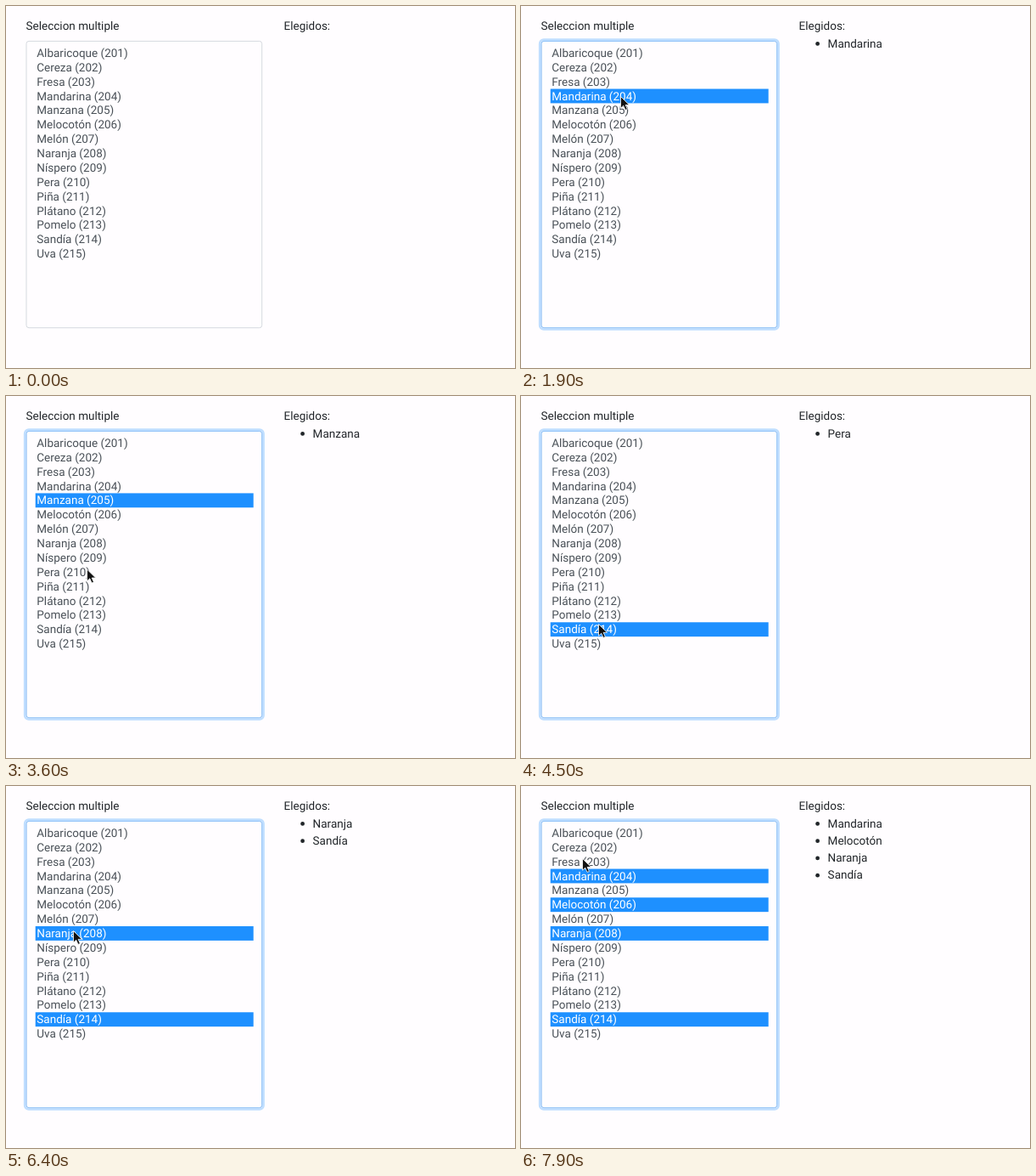
These frames come from a looping animation (600 by 426 pixels, 8000 ms). An HTML page:

```html
<!DOCTYPE html>
<html lang="es">
<head>
<meta charset="utf-8">
<title>Seleccion multiple</title>
<style>
  html, body { margin: 0; width: 100%; height: 100%; overflow: hidden; background: #fffdff; }
  svg { display: block; }
  /* The imperceptible skew keeps baselines at fractional heights. */
  text {
    font: 13.5px Roboto, Arial, sans-serif; fill: #212529;
    text-rendering: geometricPrecision; transform: skewX(.01deg);
  }
  .frame { fill: none; stroke: #ced4da; stroke-width: .85; }
  #focus .frame { stroke: #80bdff; }
  .option text { fill: #495057; }
  .option rect { fill: #1e90ff; visibility: hidden; }
  .option.on rect { visibility: visible; }
  .option.on text { fill: #fff; }
</style>
</head>
<body>
<svg width="600" height="426" viewBox="0 0 600 426">
  <text x="23.6" y="28.3">Seleccion multiple</text>
  <text x="327.6" y="28.3">Elegidos:</text>
  <rect class="frame" x="24" y="41.4" width="277.7" height="337.3" rx="3"/>
  <g id="focus">
    <rect x="22.2" y="39.6" width="281.3" height="340.9" rx="4.6" fill="none" stroke="#bfdeff" stroke-width="2.7"/>
    <rect class="frame" x="24" y="41.4" width="277.7" height="337.3" rx="3"/>
  </g>
  <g id="options"></g>
  <g id="chosen"></g>
  <path id="cursor" d="M.5 .5V14.2L3.7 11.2 6 16.4 8.4 15.4 6.1 10.4H10.6Z"
        fill="#111" stroke="#fff" stroke-width=".8" stroke-linejoin="round"/>
</svg>
<script>
const LOOP = 8000, STEP = 100, FIRST_CODE = 201;
const ROW_TOP = 46.9, ROW_H = 16.875, LINE_TOP = 48.55, LINE_H = 20.25;
const RELEASE = 100, REST = 200, TRAVEL = 600;
const fruits = ['Albaricoque', 'Cereza', 'Fresa', 'Mandarina', 'Manzana', 'Melocotón', 'Melón',
  'Naranja', 'Níspero', 'Pera', 'Piña', 'Plátano', 'Pomelo', 'Sandía', 'Uva'];

// Where the pointer is when it presses; "add" keeps the earlier selection.
const stops = [
  { at: 500, x: 582, y: 269 },
  { at: 1700, x: 117, y: 106, press: 'set' },
  { at: 2900, x: 113, y: 121, press: 'set' },
  { at: 3900, x: 95, y: 204, press: 'set' },
  { at: 4500, x: 91, y: 268, press: 'set' },
  { at: 6300, x: 79, y: 170, press: 'add' },
  { at: 7000, x: 78, y: 143, press: 'add' },
  { at: 7500, x: 76, y: 101, press: 'add' },
  { at: 7900, x: 72, y: 85 }
];
const presses = stops.filter(stop => stop.press);

const byId = id => document.getElementById(id);
const svgEl = (parent, tag, attrs, text = '') => {
  const el = document.createElementNS('http://www.w3.org/2000/svg', tag);
  for (const key in attrs) el.setAttribute(key, attrs[key]);
  el.textContent = text;
  return parent.appendChild(el);
};

const rows = fruits.map((name, i) => {
  const row = svgEl(byId('options'), 'g', { class: 'option' });
  const y = ROW_TOP + i * ROW_H;
  svgEl(row, 'rect', { x: 34.7, y, width: 257, height: ROW_H });
  svgEl(row, 'text', { x: 36.3, y: y + 13 }, `${name} (${FIRST_CODE + i})`);
  return row;
});

const lines = Array.from({ length: 4 }, (_, i) => {
  const line = svgEl(byId('chosen'), 'g', {});
  const y = LINE_TOP + i * LINE_H;
  svgEl(line, 'circle', { cx: 349.6, cy: y - 4.1, r: 2.4, fill: '#212529' });
  return { line, label: svgEl(line, 'text', { x: 361.6, y }) };
});

const rowAt = y => Math.floor((y - ROW_TOP) / ROW_H);
const easeOut = p => 1 - (1 - p) ** 3;

function selectionAt(t) {
  return presses.filter(({ at }) => at <= t)
    .reduce((kept, { y, press }) => press === 'add' ? [...kept, rowAt(y)] : [rowAt(y)], [])
    .sort((a, b) => a - b);
}

// After each press the pointer rests, then glides to the next stop.
function pointerAt(t) {
  const i = stops.findLastIndex(({ at }) => at + REST <= t);
  if (i < 0) return null;
  const from = stops[i], to = stops[i + 1] ?? from;
  const leave = from.at + REST;
  const span = Math.min(TRAVEL, to.at - leave);
  const p = easeOut(Math.min(1, (t - leave) / span));
  return [from.x + (to.x - from.x) * p, from.y + (to.y - from.y) * p];
}

function draw(t) {
  const selected = selectionAt(t), chosen = selectionAt(t - RELEASE);
  rows.forEach((row, i) => row.classList.toggle('on', selected.includes(i)));
  lines.forEach(({ line, label }, i) => {
    line.setAttribute('visibility', i < chosen.length ? 'visible' : 'hidden');
    label.textContent = fruits[chosen[i]] ?? '';
  });
  const fade = (t - presses[0].at + STEP / 2) / 150;
  byId('focus').setAttribute('opacity', Math.max(0, Math.min(1, fade)));

  const tip = pointerAt(t);
  byId('cursor').setAttribute('visibility', tip ? 'visible' : 'hidden');
  if (tip) byId('cursor').setAttribute('transform', `translate(${tip})`);
}

const start = performance.now();
function tick() {
  const t = (performance.now() - start) % LOOP;
  draw(Math.floor(t / STEP) * STEP);
  requestAnimationFrame(tick);
}
tick();
</script>
</body>
</html>
```
